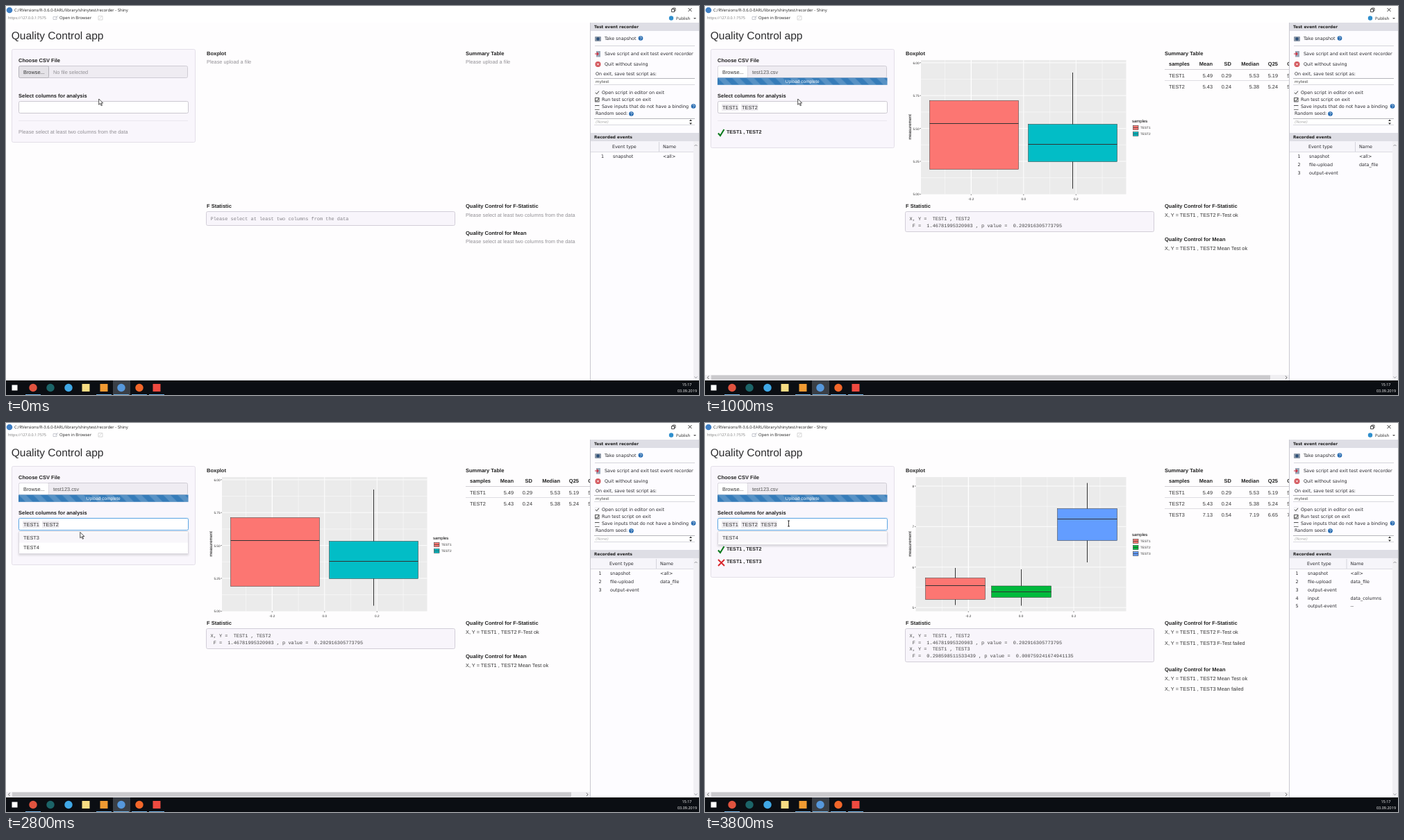
Recreate the animation shown at these times as an HTML page. Size 998 px wide and 561 px high, loop 4 s.

```html
<!DOCTYPE html>
<html lang="en">
<head>
<meta charset="utf-8">
<title>Quality Control app</title>
<style>
  html, body { margin: 0; width: 100%; height: 100%; overflow: hidden; background: #fefdfe; }
  svg { display: block; width: 998px; height: 561px; }
  text { white-space: pre; text-rendering: geometricPrecision; }
  .app { font: 7.35px "Liberation Sans", Arial, sans-serif; fill: #333; }
  .bold { font: bold 7.5px "Liberation Sans", Arial, sans-serif; fill: #222; }
  .muted { font: 7.35px "Liberation Sans", Arial, sans-serif; fill: #929095; }
  .title { font: 15.5px "Liberation Sans", Arial, sans-serif; fill: #2c2c2e; }
  .mono { font: 6.91px "Liberation Mono", Courier, monospace; fill: #444; }
  .gray { font: 6.91px "Liberation Mono", Courier, monospace; fill: #858389; }
  .tiny { font: 4.7px "Liberation Sans", Arial, sans-serif; fill: #333; }
  .axis { font: 6px "Liberation Sans", Arial, sans-serif; fill: #000; }
  .load { font: 6.5px "Liberation Sans", Arial, sans-serif; fill: #fff; }
  .side { font: 6.43px "DejaVu Sans", Verdana, sans-serif; fill: #2a2a2e; }
  .small { font: 5.6px "DejaVu Sans", Verdana, sans-serif; fill: #444; }
  .head { font: bold 5.82px "DejaVu Sans", Verdana, sans-serif; fill: #222; }
  .win { font: 5.92px "Open Sans", sans-serif; fill: #222; }
  .url { font: 5.4px "Open Sans", sans-serif; fill: #777; }
  .clock { font: 5.5px "Open Sans", sans-serif; fill: #fff; }
</style>
</head>
<body>
<svg id="stage" viewBox="0 0 998 561" xmlns="http://www.w3.org/2000/svg"></svg>
<script>
const LOOP = 4000;
const RED = '#fc7672', TEAL = '#02bdc6', GREEN = '#00ba3c', BLUE = '#639dff';
const ASK = 'Please select at least two columns from the data';

// y is the middle of the lower-case letters' line
const drop = { title: 5.2, tiny: 1.7, axis: 2, load: 2.3, small: 2, url: 2, clock: 2, head: 2.1, win: 2.1, side: 2.3 };
const text = (x, y, str, cls = 'app', extra = '') =>
  `<text x="${x}" y="${y + (drop[cls] || 2.6)}" class="${cls}" ${extra}>${str.replace(/</g, '&lt;').replace(/>/g, '&gt;')}</text>`;
const right = (x, y, str, cls) => text(x, y, str, cls, 'text-anchor="end"');
const mid = (x, y, str, cls) => text(x, y, str, cls, 'text-anchor="middle"');
const rect = (x1, y1, x2, y2, fill, extra = '') =>
  `<rect x="${x1}" y="${y1}" width="${x2 - x1}" height="${y2 - y1}" fill="${fill}" ${extra}/>`;
const box = (x1, y1, x2, y2, fill, stroke, r = 2) =>
  rect(x1 + .5, y1 + .5, x2 - .5, y2 - .5, fill, `stroke="${stroke}" rx="${r}"`);
const path = (d, stroke, w = 1, fill = 'none') => `<path d="${d}" fill="${fill}" stroke="${stroke}" stroke-width="${w}"/>`;
const hline = (x1, x2, y, stroke, w = 1) => path(`M${x1} ${y}H${x2}`, stroke, w);
const vline = (x, y1, y2, stroke, w = 1) => path(`M${x} ${y1}V${y2}`, stroke, w);
const disc = (x, y, r, fill) => `<circle cx="${x}" cy="${y}" r="${r}" fill="${fill}"/>`;
const during = (from, to, ...parts) => `<g data-from="${from}" data-to="${to}">${parts.join('')}</g>`;
const help = (x, y) => disc(x, y, 3.3, '#2469b0') + mid(x, y, '?', 'load');

function windowFrame() {
  return rect(0, 0, 998, 24, '#fff') + disc(5, 6, 4.3, '#3f7fc4') +
    text(12, 6, 'C:/RVersions/R-3.6.0-EARL/library/shinytest/recorder - Shiny', 'win') +
    text(3, 17, 'https://127.0.0.1:7575', 'url') +
    path('M68 15.500h5v4h-5zM71 18l4-4', '#b9bcc4', .8) +
    text(77, 17, 'Open in Browser', 'win') +
    path('M133 14.500h6v5.500h-6zM134.500 18.500l3-3', '#ccc', .8) +
    path('M958.500 4.500h4v4h-4zM960 4.500v-1.500h4v4h-1.500', '#222', .8) +
    path('M982.500 3l5 5M987.500 3l-5 5', '#222', .9) +
    disc(958, 17.5, 3.2, '#2f8fcd') + text(965, 17.5, 'Publish', 'win') +
    path('M990 17h4l-2 2z', 'none', 0, '#555');
}

function taskbar() {
  const dots = [[39, '#e0533f'], [64, '#1c6468'], [90, '#40a8e6'], [166, '#5698dc'], [192, '#f2672a']];
  const tiles = [[115, '#f7dc83'], [141, '#f09a32'], [217, '#ef4a40']];
  return rect(0, 540, 998, 561, '#0b0e13') + rect(154, 540, 179, 561, '#3a3f46') +
    rect(8.5, 546.5, 16.5, 554.5, '#fff') +
    dots.map(([x, c]) => disc(x, 550.5, 5.7, c)).join('') +
    tiles.map(([x, c]) => rect(x - 5.5, 545, x + 5.5, 556, c)).join('') +
    [39, 141, 166, 192, 217].map(x => rect(x - 11, 560, x + 11, 561, '#73b4e8')).join('') +
    mid(980.5, 545.5, '15:17', 'clock') + mid(981, 555, '03.09.2019', 'clock');
}

function recorder() {
  const bar = (y, str) => rect(842, y, 998, y + 12, '#dedee5') + text(847, y + 6, str, 'head');
  const field = y => rect(847, y, 992, y + 10, '#fff') + hline(847, 992, y + .5, '#b5b5bb') + hline(847, 992, y + 9.5, '#d9d9df');
  const check = (y, on, tone) => box(848, y - 3.5, 854.5, y + 3, '#fff', tone, 0) +
    (on ? path(`M849 ${y}l1.800 1.800 3-4`, '#222', .9) : '');
  return rect(841, 24, 998, 540, '#fdfcff') + vline(841.5, 24, 540, '#c9c9d0') + bar(24, 'Test event recorder') +
    rect(848, 44, 857, 51, '#8d99a8', 'rx="1"') + disc(852.5, 47.5, 2.3, '#2c4f78') +
    text(862, 47, 'Take snapshot', 'side') + help(914, 46.5) + hline(848, 992, 57.5, '#d4d4da') +
    rect(850, 65, 856, 73.5, '#9aa7b8') + path('M848 69h5m-2-2l2 2-2 2', '#d22c3c', 1.2) +
    text(862, 69, 'Save script and exit test event recorder', 'side') +
    disc(852.5, 84, 4, '#d3545a') + path('M851 82.500l3 3m0-3l-3 3', '#fff') +
    text(862, 84, 'Quit without saving', 'side') +
    text(849, 98, 'On exit, save test script as:', 'side') + field(104) + text(849, 109, 'mytest', 'small') +
    check(125, true, '#ececf0') + text(858, 124.3, 'Open script in editor on exit', 'side') +
    check(135.5, true, '#555') + text(858, 134.5, 'Run test script on exit', 'side') +
    check(147, false, '#ececf0') + hline(848, 854.5, 143.5, '#555') + hline(848, 854.5, 149.5, '#777') +
    text(858, 145, 'Save inputs that do not have a binding', 'side') + help(990, 144.5) +
    text(849, 155, 'Random seed:', 'side') + help(900.5, 155.5) + field(162) +
    text(849, 167, '(None)', 'small', 'style="fill:#aaa;font-style:italic"') +
    path('M984 166l2-2.500 2 2.500zM984 168.500l2 2.500 2-2.500z', 'none', 0, '#333') +
    bar(183, 'Recorded events') + rect(842, 195, 990, 210, '#f6f5fa') + hline(842, 990, 210.5, '#dcdce2') +
    rect(990, 195, 998, 540, '#f1f0f4') +
    path('M991.500 202l2-2 2 2M991.500 534.500l2 2 2-2', '#8a8a90', .9);
}

function events(from, to, count, num, type, name) {
  const rows = [['snapshot', '<all>'], ['file-upload', 'data_file'], ['output-event', ''], ['input', 'data_columns'], ['output-event', '--']];
  return during(from, to,
    text(type, 203, 'Event type', 'side'), text(name, 203, 'Name', 'side'), vline(name - 5.5, 196, 210, '#d5d5dc'),
    ...rows.slice(0, count).map(([a, b], i) => {
      const y = 216.5 + i * 11.9;
      return right(num, y, `${i + 1}`, 'side') + text(type + 1, y, a, 'side') + text(name, y, b, 'side');
    }));
}

const well = (from, to, bottom) => during(from, to, box(8, 62, 273, bottom, '#f9f6fc', '#e3dfe8'));

function progress(from, to, width) {
  return during(from, to, rect(18, 103.5, 18 + width, 113.8, '#367cb9'),
    rect(18, 103.5, 18 + width, 113.8, 'url(#stripe)'),
    width > 60 ? mid(18 + width / 2, 108.7, 'Upload complete', 'load') : '');
}

function form() {
  const tag = (x, n) => rect(x, 141, x + 24.5, 151.5, '#efedf1', 'rx="1"') + text(x + 1, 146, 'TEST' + n);
  return well(0, 1000, 197) + well(1000, 3400, 205) + well(3400, LOOP, 223) +
    text(18, 78, 'Choose CSV File', 'bold') + box(18, 86, 262, 104, '#efecf2', '#cfccd4') +
    during(0, 400, box(18, 86, 62, 104, '#e4e2e7', '#b5b3ba'), text(68, 95, 'No file selected', 'muted')) +
    during(400, LOOP, box(18, 86, 62, 104, '#fff', '#dddae2'), text(68, 95, 'test123.csv', 'app', 'style="fill:#555"')) +
    text(25, 95, 'Browse...') +
    progress(400, 600, 40) + progress(600, 800, 170) + progress(800, 1000, 242) + progress(1000, LOOP, 244.5) +
    text(18, 129.5, 'Select columns for analysis', 'bold') +
    during(0, 2400, box(18, 137, 263, 155, '#fff', '#cbc8d0')) +
    during(2400, LOOP, rect(17, 136, 264, 156, '#e6eff9', 'rx="3"'), box(18, 137, 263, 155, '#fff', '#66a9e4')) +
    during(800, LOOP, tag(24, 1), tag(52, 2)) + during(3000, LOOP, tag(79.5, 3)) +
    during(3000, 3400, vline(106.5, 141, 151, '#222', .9)) +
    hline(18, 262, 165.5, '#ebe8ef') +
    during(0, 1000, text(18, 181.5, ASK, 'muted')) +
    during(1000, LOOP, path('M19 183.500l3 3.500 5.500-9', '#0b7a1c', 2.1), text(31, 181.5, 'TEST1 , TEST2', 'bold', 'style="font-size:7.15px"')) +
    during(3400, LOOP, path('M19 197l9 9m0-9l-9 9', '#d9262c', 1.9), text(31, 199.5, 'TEST1 , TEST3', 'bold', 'style="font-size:7.15px"'));
}

function menu(from, to, bottom, items) {
  return during(from, to, rect(18, 158, 263, bottom + 2, '#000', 'opacity=".12" filter="url(#soft)"'),
    box(18, 156, 263, bottom, '#fff', '#dcd9e0', 1), rect(19, 158.5, 262, 172.5, '#f8f6fa'),
    ...items.map((n, i) => text(25, 165.7 + i * 14, 'TEST' + n)));
}

// boxes: [left, right, top, bottom, median, whisker top, whisker bottom, colour]
function plot({ left, xs, ys, labels, boxes, legendY }) {
  const half = (xs[1] - xs[0]) / 2, rise = (ys[1] - ys[0]) / 2;
  const inX = x => x > left && x < 606, inY = y => y > 78 && y < 271;
  const grid = (w, dx, dy) =>
    [xs[0] - 2 * dx, ...xs].map(x => x + dx).filter(inX).map(x => vline(x, 78, 271.5, '#fff', w)).join('') +
    ys.map(y => y + dy).filter(inY).map(y => hline(left, 606.5, y, '#fff', w)).join('');
  return rect(left, 78, 606.5, 271.5, '#ebebeb') + grid(.45, half, rise) + grid(.9, 0, 0) +
    ys.map((y, i) => right(left - 2.5, y + .3, labels[i], 'tiny') + hline(left - 1.5, left, y, '#444', .7)).join('') +
    xs.map((x, i) => mid(x, 278, ['-0.2', '0.0', '0.2'][i], 'tiny') + vline(x, 271.5, 273, '#444', .7)).join('') +
    boxes.map(([l, r, t, b, m, up, low, c]) =>
      (up < low ? vline((l + r) / 2, up, low, '#333') : '') +
      rect(l, t, r, b, c, 'stroke="#333" stroke-width=".5"') + hline(l, r, m, '#333')).join('') +
    `<text class="axis" text-anchor="middle" transform="translate(296.5 174.500) rotate(-90)">measurement</text>` +
    text(615, legendY, 'samples', 'axis') +
    boxes.map((b, i) => {
      const y = legendY + 9.5 + 9 * i;
      return rect(616, y - 3.7, 624.5, y + 3.7, '#ebebeb') + rect(616.5, y - 3, 624, y + 3, b[7], 'stroke="#333" stroke-width=".5"') +
        hline(616.5, 624, y, '#333', .7) + text(627, y, 'TEST' + (i + 1), 'tiny');
    }).join('');
}

function table() {
  const ends = [731, 758, 798, 825, 852.5];
  const row = (y, name, cells, cls) => text(668, y, name, cls) + cells.map((c, i) => right(ends[i], y, c, cls)).join('');
  const data = (y, n, list) => row(y, 'TEST' + n, list.split(' '));
  return `<g clip-path="url(#page)">` + during(1000, LOOP,
    row(83.5, 'samples', ['Mean', 'SD', 'Median', 'Q25', 'Q75'], 'bold'),
    hline(662, 860, 91.5, '#d2d0d5'), hline(662, 860, 107.5, '#dfdde2'),
    data(100, 1, '5.49 0.29 5.53 5.19 5.71'), data(116, 2, '5.43 0.24 5.38 5.24 5.53')) +
    during(3400, LOOP, hline(662, 860, 123.5, '#dfdde2'), data(132, 3, '7.13 0.54 7.19 6.65 7.44')) + '</g>';
}

function results() {
  const pre = (from, to, bottom, lines, cls) => during(from, to, box(288, 296, 647, bottom, '#f8f5fb', '#d2ced8'),
    ...lines.map((s, i) => text(294.5, 306.5 + i * 9.5, s, cls)));
  const first = ['X, Y =  TEST1 , TEST2', ' F =  1.46781995320903 , p value =  0.202916305773795'];
  const second = ['X, Y =  TEST1 , TEST3', ' F =  0.298598511533439 , p value =  0.000759241674941135'];
  const pair = n => `X, Y = TEST1 , TEST${n} `;
  const meanHead = y => text(662, y, 'Quality Control for Mean', 'bold');
  return text(7.8, 43, 'Quality Control app', 'title') +
    text(289, 68, 'Boxplot', 'bold') + text(662, 68, 'Summary Table', 'bold') +
    text(289, 288.5, 'F Statistic', 'bold') + text(662, 288.5, 'Quality Control for F-Statistic', 'bold') +
    during(0, 800, ...[289, 662].map(x => text(x, 80.5, 'Please upload a file', 'muted'))) +
    during(800, 1000, ...[289, 662].map(x => text(x, 80.5, ASK, 'muted'))) +
    during(0, 1000, text(662, 301, ASK, 'muted'), meanHead(327), text(662, 339.7, ASK, 'muted')) +
    pre(0, 1000, 317, [ASK], 'gray') + pre(1000, 3400, 326, first, 'mono') + pre(3400, LOOP, 345, [...first, ...second], 'mono') +
    during(1000, LOOP, text(662, 301, pair(2) + 'F-Test ok')) +
    during(1000, 3400, meanHead(336.5), text(662, 349, pair(2) + 'Mean Test ok')) +
    during(3400, LOOP, text(662, 317, pair(3) + 'F-Test failed'), meanHead(355),
      text(662, 368, pair(2) + 'Mean Test ok'), text(662, 383.5, pair(3) + 'Mean failed')) +
    during(1000, 3400, plot({
      left: 311, xs: [383.3, 458.8, 534.3], ys: [81.8, 129.2, 176.6, 224, 271.4], legendY: 166,
      labels: ['6.00', '5.75', '5.50', '5.25', '5.00'],
      boxes: [[323.5, 451.5, 136.5, 235.5, 169.5, 0, 0, RED], [465.5, 593.5, 170.5, 224.5, 199.5, 96, 263.5, TEAL]]
    })) +
    during(3400, LOOP, plot({
      left: 303.5, xs: [379.3, 455, 531], ys: [91, 149.4, 207.8, 266.2], legendY: 161,
      labels: ['8', '7', '6', '5'],
      boxes: [[317.5, 403.5, 223.5, 254.5, 234.5, 209, 262.5, RED], [412.5, 498.5, 235, 251.5, 243.5, 211, 263.5, GREEN],
        [507.5, 593.5, 123.5, 169.5, 138.5, 86.5, 201, BLUE]]
    })) +
    table() +
    during(1000, LOOP, rect(0, 532, 841, 540, '#f0eff2'), rect(9, 532.5, 814, 539, '#cbcacd'),
      path('M5.500 533.500l-2 2.300 2 2.300M836 533.500l2 2.300-2 2.300', '#555', .9));
}

const cursors = {
  arrow: path('M0 0V8.300L2 6.500 3.500 9.800 4.800 9.200 3.300 6H6z', '#222', .8, '#fff'),
  beam: path('M-1.500-4h3M-1.500 4h3M0-4V4', '#222', .9),
  hand: path('M-1.500 6V.800a1 1 0 0 1 2 0V4l4.500.800q1 .400.800 1.500L5 10.500H0L-3 6.800q.400-1.300 1.500-.500z', '#222', .8, '#fff')
};
const track = [
  [0, 'arrow', 133.7, 134], [1600, 'beam', 134.5, 138.5], [2000, 'beam', 133.5, 138.5], [2200, 'beam', 130.5, 142],
  [2600, 'arrow', 119.5, 146], [2800, 'arrow', 106.8, 157.5], [3000, 'hand', 104, 161.5],
  [3600, 'beam', 120.5, 143], [3800, 'beam', 120.5, 145]
];

const stage = document.getElementById('stage');
stage.innerHTML = `<defs>
  <pattern id="stripe" x="18" y="103.5" width="20.8" height="10.4" patternUnits="userSpaceOnUse">
    <path d="M0 0H10.400L20.800 10.400H10.400z" fill="#fff" opacity=".17"/></pattern>
  <filter id="soft"><feGaussianBlur stdDeviation="1.5"/></filter>
  <clipPath id="page"><rect width="841" height="540"/></clipPath></defs>` +
  rect(0, 0, 998, 561, '#fefdfe') + results() + form() +
  menu(2400, 3000, 189, [3, 4]) + menu(3000, LOOP, 176, [4]) +
  windowFrame() + recorder() +
  events(0, 800, 1, 861, 873, 946) + events(800, 1000, 2, 859, 870.5, 937) + events(1000, 3200, 3, 857.5, 869, 942) +
  events(3200, 3400, 4, 854.5, 867, 929.5) + events(3400, LOOP, 5, 854.5, 867, 929.5) +
  taskbar() +
  track.map(([at, kind, x, y], i) =>
    during(at, i + 1 < track.length ? track[i + 1][0] : LOOP, `<g transform="translate(${x} ${y})">${cursors[kind]}</g>`)).join('');

const layers = [...stage.querySelectorAll('[data-from]')].map(node =>
  ({ node, from: +node.dataset.from, to: +node.dataset.to }));

function draw() {
  const t = performance.now() % LOOP;
  for (const { node, from, to } of layers) node.style.display = t >= from && t < to ? '' : 'none';
  requestAnimationFrame(draw);
}
draw();
</script>
</body>
</html>
```
